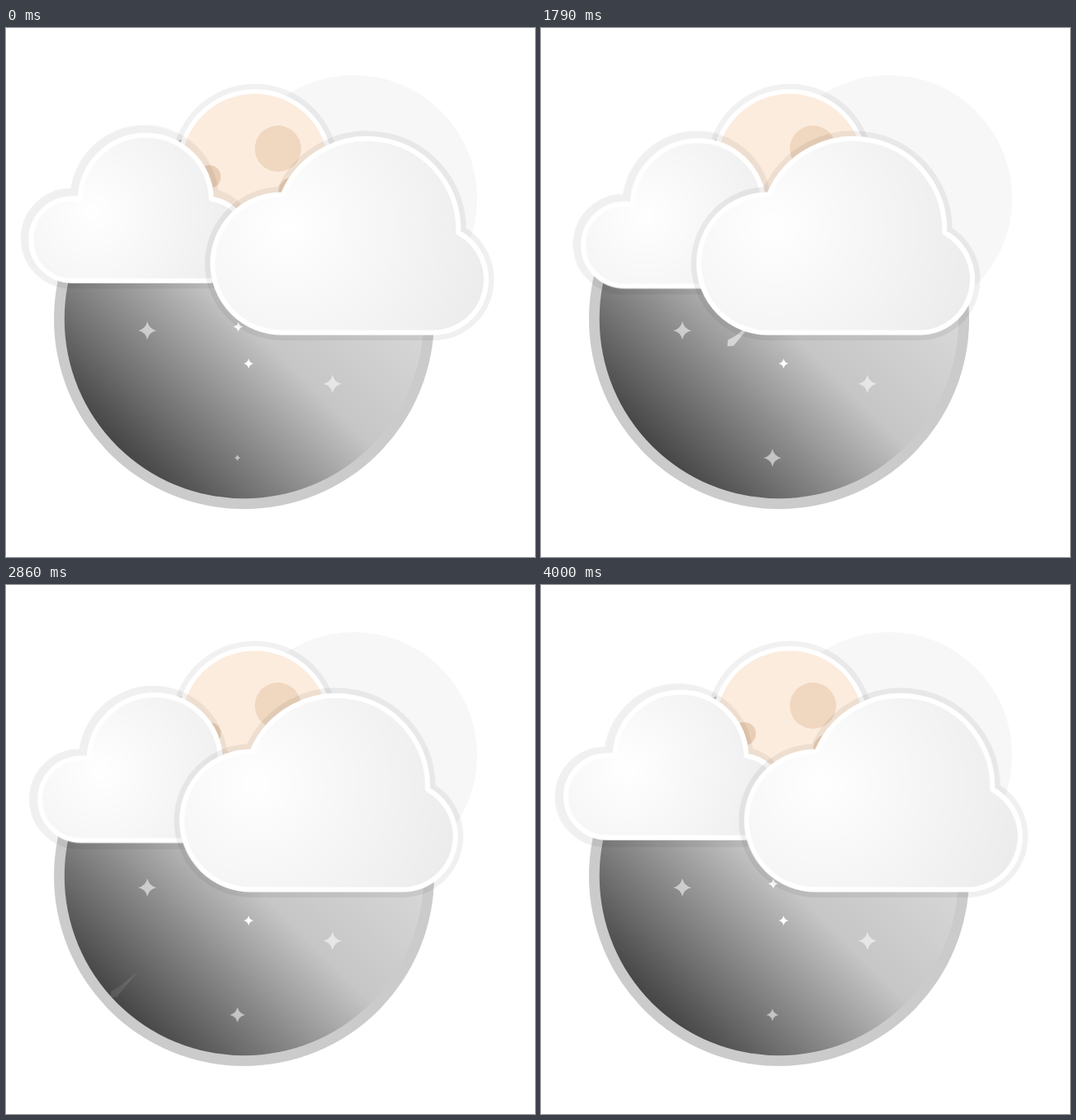
Write an HTML page that moves like this. It is 640 px wide and 640 px high and loops after 4.07 s.

```html
<!DOCTYPE html>
<html lang="en">
<head>
<meta charset="utf-8">
<title>Cloudy night</title>
<style>
html, body { margin: 0; width: 100%; height: 100%; overflow: hidden; background: #fff; }
svg { display: block; width: 100vw; height: 100vh; }

.move { animation: 4070ms linear infinite; }
.big { animation-name: big; }
.small { animation-name: small; }
.small-shade { animation-name: small-shade; }
.twinkle { animation-name: twinkle; }
.comet { animation-name: comet; }

.cloud { stroke: #fff; stroke-width: 6; stroke-linejoin: round; }
.shade { fill: none; stroke: #000; stroke-opacity: .058; stroke-linejoin: round; }

@keyframes big {
  0% { transform: translateX(0); }
  49% { transform: translateX(-65.8px); }
  78.9% { transform: translateX(-25.8px); }
  98.3%, 100% { transform: translateX(-1.3px); }
}
@keyframes small {
  0%, 98.3%, 100% { transform: translate(0, 0); }
  31.9% { transform: translate(25.8px, 8px); }
}
@keyframes small-shade {
  0% { transform: translate(-1.5px, -1.5px); }
  31.9% { transform: translate(24.2px, 6.8px); }
  98.3%, 100% { transform: translate(-2.5px, .3px); }
}
@keyframes twinkle {
  0% { transform: scale(.36); }
  45.5% { transform: scale(1); }
  98.3%, 100% { transform: scale(.68); }
}
@keyframes comet {
  0%, 36.8% { transform: translate(98.8px, -113.8px); opacity: 0; }
  36.9% { transform: translate(98.8px, -113.8px); opacity: .64; }
  44% { transform: translate(72px, -83px); opacity: .55; }
  63.1% { transform: translate(0, 0); opacity: .31; }
  73.7%, 100% { transform: translate(-39.7px, 45.8px); opacity: 0; }
}
</style>
</head>
<body>
<svg viewBox="0 0 640 640">
  <defs>
    <linearGradient id="night" x1="0" y1="1" x2="1" y2="0">
      <stop offset=".147" stop-color="#464646"/>
      <stop offset=".5" stop-color="#c6c6c6"/>
      <stop offset=".75" stop-color="#d8d8d8"/>
    </linearGradient>
    <radialGradient id="bigFill" gradientUnits="userSpaceOnUse" cx="340" cy="240" r="250">
      <stop stop-color="#fff"/>
      <stop offset="1" stop-color="#ececec"/>
    </radialGradient>
    <radialGradient id="smallFill" gradientUnits="userSpaceOnUse" cx="105" cy="222" r="175">
      <stop stop-color="#fff"/>
      <stop offset="1" stop-color="#eee"/>
    </radialGradient>
    <path id="bigCloud" d="M333.5 368.5A83.5 83.5 0 0 1 333.5 201.5L335 201.5A110.5 110.5 0 0 1 547.3 247.5A64.4 64.4 0 0 1 518 368.5Z"/>
    <path id="smallCloud" d="M80 305.8A49.8 49.8 0 0 1 80 206.2L89.5 206.2A79.5 79.5 0 0 1 248.4 206.7A49.8 49.8 0 0 1 240 305.8Z"/>
    <path id="star" d="M0-11Q2-2 11 0Q2 2 0 11Q-2 2-11 0Q-2-2 0-11Z"/>
  </defs>

  <circle cx="421" cy="206" r="149" fill="#f7f7f7"/>

  <circle cx="288" cy="352" r="230" fill="#cbcbcb"/>
  <circle cx="288" cy="352" r="217.3" fill="url(#night)"/>

  <g fill="#fff">
    <use href="#star" x="171" y="366" opacity=".55"/>
    <use href="#star" x="395" y="430.5" opacity=".55"/>
    <use href="#star" transform="translate(293.5 406) scale(.55)"/>
    <use href="#star" transform="translate(281 361.5) scale(.55)"/>
    <g transform="translate(280 520)" opacity=".55">
      <g class="move twinkle"><use href="#star"/></g>
    </g>
    <path class="move comet" d="M154 460.5L164 455L187 436L167 460L161 467.5L153.5 468Z"/>
  </g>

  <circle cx="301" cy="168.5" r="101" fill-opacity=".055"/>
  <circle cx="301" cy="168.5" r="94.5" fill="#fff"/>
  <circle cx="301" cy="168.5" r="89" fill="#fcecde"/>
  <circle cx="329" cy="146" r="28" fill="#f0d7bf"/>
  <circle cx="246" cy="180" r="14" fill="#e9ceb5"/>
  <circle cx="347" cy="198" r="17.5" fill="#e9ceb5"/>

  <use href="#smallCloud" class="move shade small-shade" stroke-width="22"/>
  <use href="#smallCloud" class="move cloud small" fill="url(#smallFill)"/>

  <g class="move big">
    <use href="#bigCloud" class="shade" stroke-width="19"/>
    <use href="#bigCloud" class="cloud" fill="url(#bigFill)"/>
  </g>
</svg>
</body>
</html>
```
